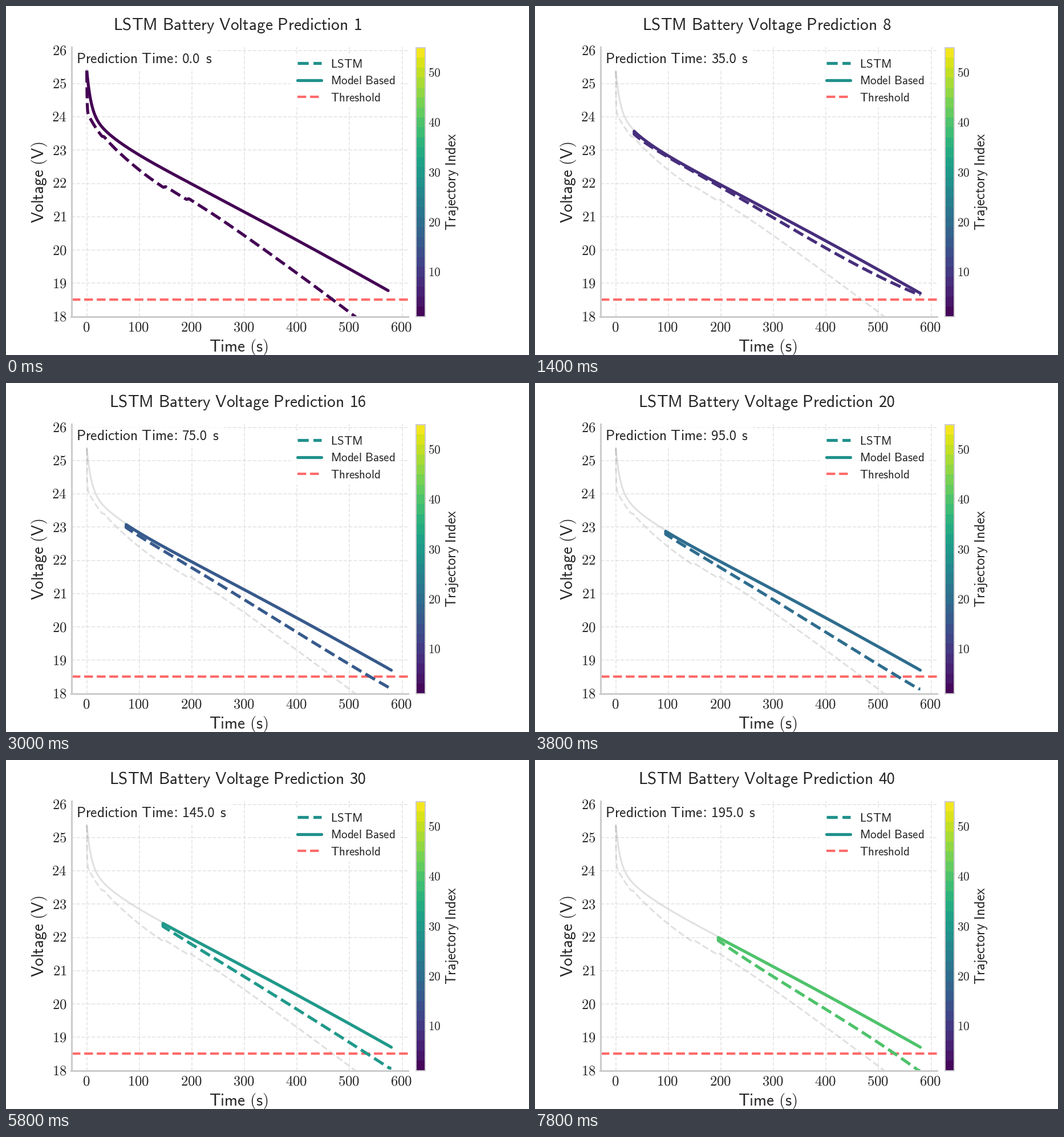
A matplotlib script for the animation above (8000 ms loop, 917 px wide and 611 px high).

```python
import numpy as np
import matplotlib as mpl
import matplotlib.pyplot as plt
from matplotlib.animation import FuncAnimation
from matplotlib.patches import Rectangle

W, H, DPI = 917, 611, 64
PT = 72 / DPI                      # points per pixel
LW = 150 / 72 * PT                 # line widths are set for 150 dpi
THICK, MEDIUM, THIN, HAIR = 2.5 * LW, 2 * LW, 1.5 * LW, 0.8 * LW
INK, EDGE, RED = "0.15", "0.8", "#ff6b6b"
DASH = (0, (3.7, 1.6))
COUNT = 55
cmap = plt.get_cmap("viridis")

mpl.rcParams["mathtext.fontset"] = "cm"
mpl.rcParams["lines.solid_capstyle"] = "round"
mpl.rcParams["lines.dash_joinstyle"] = "round"

fig = plt.figure(figsize=(W / DPI, H / DPI), dpi=DPI, facecolor="white")

# Plot area, given by its pixel edges and scale
LEFT, RIGHT, TOP, BOTTOM = 114.5, 705, 72, 543.5
X0, SX, SY = 141.6, 0.9215, 58.25
ax = fig.add_axes([LEFT / W, 1 - BOTTOM / H, (RIGHT - LEFT) / W, (BOTTOM - TOP) / H])
ax.set_xlim((LEFT - X0) / SX, (RIGHT - X0) / SX)
ax.set_ylim(18, 18 + (BOTTOM - TOP) / SY)
ax.set_xticks([])
ax.set_yticks([])
for side in ("top", "right"):
    ax.spines[side].set_visible(False)
for side in ("left", "bottom"):
    ax.spines[side].set(color=EDGE, linewidth=THIN, zorder=6)

# Overlay in pixel units, y down
stage = fig.add_axes([0, 0, 1, 1], zorder=2)
stage.set_xlim(0, W)
stage.set_ylim(H, 0)
stage.axis("off")


def text(x, y, s, size, family="sf", **kw):
    s = s.replace(" ", r"\ ")
    return stage.text(x, y, rf"$\math{family}{{{s}}}$", fontsize=size * PT,
                      color=INK, va="baseline", **kw)


def digits(x, y, s, size):
    return stage.text(x, y, s, fontsize=size * 0.895 * PT, color=INK,
                      family="Noto Sans CJK JP", va="baseline")


def upright(x, y, s, size):
    text(x, y, s, size, ha="center", rotation=90, rotation_mode="anchor")


def box(x, y, w, h):
    return stage.add_patch(Rectangle((x, y), w, h, fc="white", ec="none", alpha=0.8))


# Grid and tick labels
grid = dict(color=EDGE, alpha=0.5, lw=HAIR, ls=DASH, zorder=0.5)
for t in range(0, 601, 100):
    ax.axvline(t, **grid)
    text(X0 + SX * t - 1.2, 569, str(t), 24.8, "rm", ha="center")
for v in range(18, 27):
    ax.axhline(v, **grid)
    text(106.5, BOTTOM - SY * (v - 18) + 8, str(v), 24.8, "rm", ha="right")

text(408.5, 604.5, "Time (s)", 29.2, ha="center")
upright(66, 308.5, "Voltage (V)", 29.2)

# Colour bar
BX, BY, BW, BH, BANDS = 719, 73, 16, 470.5, 27
for i in range(BANDS):
    y = BY + BH * (BANDS - 1 - i) / BANDS
    stage.add_patch(Rectangle((BX, y), BW, BH / BANDS, fc=cmap((i + 0.5) / BANDS),
                              ec="none", antialiased=False))
stage.add_patch(Rectangle((BX, BY), BW, BH, fill=False, ec=EDGE, lw=2 * PT))
for n in range(10, 51, 10):
    text(740.5, BY + BH * (COUNT - n) / (COUNT - 1) + 7.7, str(n), 21.3, "rm")
upright(789, 308, "Trajectory Index", 24.7)

# Legend
box(499, 83, 193, 95)
teal = cmap(0.5)
entries = (("LSTM", teal, THICK, DASH), ("Model Based", teal, THICK, "-"),
           ("Threshold", RED, MEDIUM, DASH))
for i, (name, color, lw, ls) in enumerate(entries):
    y = 100 + 29.7 * i
    stage.plot([511, 553], [y, y], color=color, lw=lw, ls=ls)
    text(568.7, y + 7.6, name, 21.1)


def model(t):
    return (23.573 - 0.00783 * t - 0.93e-6 * t ** 2
            + 0.59 * np.exp(-t / 47) + 1.23 * np.exp(-t / 8))


def first_network(t):
    """Early prediction: sagging line with a steep start and small hitches."""
    v = (23.574 - 0.00985 * t - 2.1e-6 * t ** 2
         + 0.6 * np.exp(-t / 25) + 1.2 * np.exp(-t / 0.6)
         - 0.2 * np.exp(-((t - 125) / 70) ** 2))
    for c in (31, 148, 192):
        v += 0.04 * np.tanh((t - c) / 2) * np.exp(-abs(t - c) / 15)
    return v


def later_network(start, n, end):
    """Model minus a gap that widens with time and with the index."""
    grown = np.clip((n - 8) / 4, 0, 1)
    wide = 0.5 + 0.5 * grown
    tail = (0.45 + 0.007 * n) * (0.14 + 0.86 * grown)
    knots = np.array([start, 300, 400, 576]) / 100
    fit = np.polyfit(knots, [0.09, 0.3 * wide, 0.43 * wide, tail], 3)
    t = np.linspace(start, 576, 200)
    v = later_model(t) - np.polyval(fit, t / 100)
    return np.r_[start, t, end], np.r_[later_model(start), v, v[-1]]


def later_model(t):
    return model(t) - 0.025


ax.axhline(18.5, color=RED, lw=MEDIUM, ls=DASH, zorder=2)

FIRST_END, LATER_END = 573.5, 579.5
full = np.linspace(0, FIRST_END, 1200)
trail_style = dict(color="0.5", alpha=0.23, lw=THIN, zorder=1.5)
trails = [ax.plot(full, model(full), **trail_style)[0],
          ax.plot(full, first_network(full), ls=DASH, **trail_style)[0]]
net_line, = ax.plot([], [], lw=THICK, ls=DASH, zorder=3)
model_line, = ax.plot([], [], lw=THICK, zorder=3)

title = text(0, 41.5, "LSTM Battery Voltage Prediction", 29.26)
title_no = digits(0, 41.5, "", 29.26)

time_box = box(116.5, TOP - 1, 250, 42)
text(122.8, 100, "Prediction Time", 25.35)
digits(294.3, 100, ":", 25.35)
clock = digits(309, 100, "", 25.35)
unit = text(0, 100, "s", 25.35)


def update(i):
    n = i + 1
    start = 5.0 * i

    shift = 7.3 * (len(str(n)) - 1)
    title.set_x(188.5 - shift)
    title_no.set_x(609.9 - shift)
    title_no.set_text(str(n))

    label = f"{start:.1f}"
    clock.set_text(label)
    unit_x = 309 + 12.65 * (len(label) - 1) + 15.5
    unit.set_x(unit_x)
    time_box.set_width(unit_x + 20.5 - time_box.get_x())

    if n == 1:
        net_line.set_data(full, first_network(full))
        model_line.set_data(full, model(full))
    else:
        t = np.linspace(start, LATER_END, 600)
        net_line.set_data(*later_network(start, n, LATER_END))
        model_line.set_data(t, later_model(t))
    for line in (net_line, model_line):
        line.set_color(cmap(i / (COUNT - 1)))
    for line in trails:
        line.set_visible(n > 1)
    return net_line, model_line


anim = FuncAnimation(fig, update, frames=40, init_func=lambda: update(0),
                     interval=200, repeat=True, repeat_delay=0)
plt.show()
```
